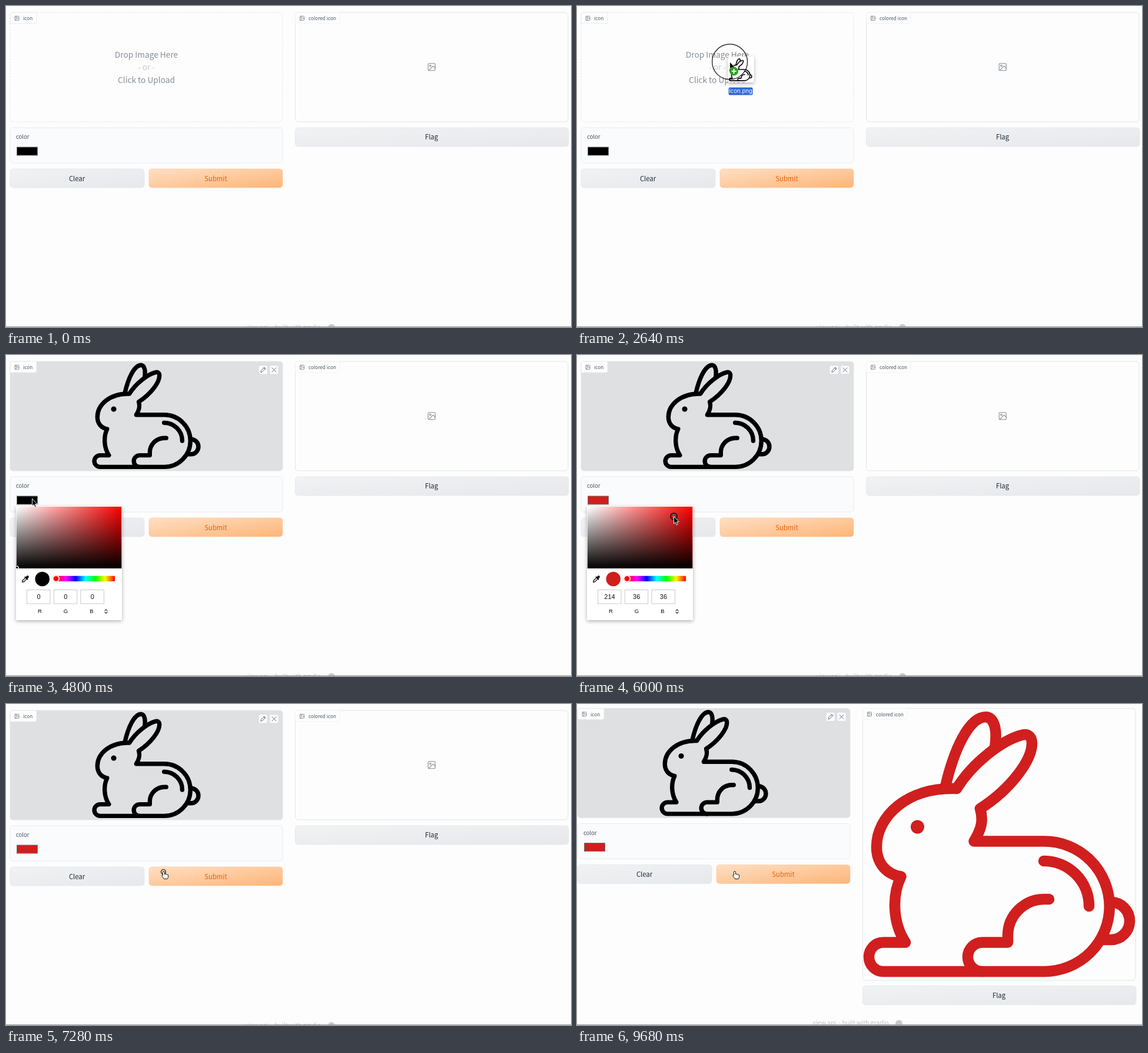
Animation of 960 by 546 pixels, one loop 9760 ms. Source, as an HTML page:

```html
<!DOCTYPE html>
<html lang="en">
<head>
<meta charset="utf-8">
<title>Icon colouring demo</title>
<style>
  html, body { margin: 0; width: 100%; height: 100%; overflow: hidden; background: #fdfdfd; }
  svg { display: block; }
  text { font-family: "Noto Sans CJK JP", "Noto Sans CJK SC", "Noto Sans CJK", "Open Sans", sans-serif; fill: #4b5563; }
  .mid { text-anchor: middle; }
  .button { font-size: 11.3px; font-weight: 500; fill: #1f2937; }
  .tag { font-size: 8.2px; }
  .drop { font-size: 13.7px; fill: #868c97; }
  .picker text { font-family: "Liberation Sans", Arial, sans-serif; fill: #111; }
  .line { fill: none; stroke-linecap: round; stroke-linejoin: round; }
  .panel { fill: #fdfdfd; stroke: #e2e4e9; }
</style>
</head>
<body>
<svg width="960" height="546" viewBox="0 0 960 546">
  <defs>
    <linearGradient id="grey" x2="1" y2="1">
      <stop stop-color="#f1f2f4"/><stop offset="1" stop-color="#e6e8eb"/>
    </linearGradient>
    <linearGradient id="orange" x2="1" y2="1">
      <stop stop-color="#ffdfc4"/><stop offset="1" stop-color="#fdb577"/>
    </linearGradient>
    <linearGradient id="saturation">
      <stop stop-color="#fff"/><stop offset="1" stop-color="#f00"/>
    </linearGradient>
    <linearGradient id="value" x2="0" y2="1">
      <stop stop-color="#000" stop-opacity="0"/><stop offset="1"/>
    </linearGradient>
    <linearGradient id="hue"></linearGradient>
    <filter id="shadow" x="-20%" y="-20%" width="140%" height="140%">
      <feDropShadow dx="0" dy="2" stdDeviation="3" flood-opacity=".3"/>
    </filter>
    <clipPath id="field"><rect x="17.5" y="258" width="179" height="105"/></clipPath>
    <g id="rabbit" class="line" stroke="currentColor" stroke-width="18.5">
      <path d="M645 144C560 141 509 192 509 243C509 272 527 290 550.5 293.5C535 325 536 372 558 405.5
        H520.7a24.7 24.7 0 0 0 0 49.5H794a110.7 110.7 0 0 0 0-221.5H674.5C687 213 691 198 685 178
        C738 144 773 95 773 67C773 54 765 50 755 53C722 62 672 100 645 144Z"/>
      <path d="M626 140C640 80 665 22 695 22C711 24 714 48 710 74"/>
      <path d="M802 332H794A62 62 0 0 0 732 394V405.5H688.7a24.7 24.7 0 0 0 0 49.5"/>
      <path d="M793 267A77 77 0 0 1 870 344M907 337a32 32 0 0 1 0 64H897"/>
      <circle cx="578.5" cy="209" r="11.5" fill="currentColor" stroke="none"/>
    </g>
    <g id="picture" class="line">
      <rect x="-6" y="-6" width="12" height="12" rx="1.5"/>
      <circle cx="-2.2" cy="-2.2" r="1.3"/>
      <path d="M6 2L2.5-1.5L-5 6"/>
    </g>
  </defs>

  <g id="page">
    <rect id="dropBox" class="panel" x="7" y="11" width="463" height="186" rx="5"/>
    <g id="dropHint" class="mid">
      <text class="drop" x="238.5" y="88">Drop Image Here</text>
      <text class="drop" x="238.5" y="109" style="fill:#c5c8ce">- or -</text>
      <text class="drop" x="238.5" y="130.5">Click to Upload</text>
    </g>
    <g id="loaded">
      <use href="#rabbit" transform="translate(-47.9 8.4) scale(.3992 .4)" color="#000"/>
      <g fill="#f9fafb" stroke="#d4d7dc" stroke-width=".8">
        <rect x="429" y="17.5" width="15.5" height="15.5" rx="3"/>
        <rect x="447.7" y="17.5" width="15.5" height="15.5" rx="3"/>
      </g>
      <path class="line" stroke="#5b6370" stroke-width=".9"
        d="M433 29l.6-2.6 5.5-5.5 2 2-5.5 5.5zM438 22l2 2M452 21.8l7 7M459 21.8l-7 7"/>
    </g>
    <path class="panel" stroke-width=".8" d="M7 30V15q0-4 4-4H52V27q0 3-3 3z"/>
    <use href="#picture" transform="translate(18.5 20.8) scale(.58)" stroke="#6b7280" stroke-width="1.4"/>
    <text class="tag" x="29" y="24">icon</text>

    <rect id="output" class="panel" x="491.5" y="11" width="463.5" rx="5"/>
    <path class="panel" stroke-width=".8" d="M491.5 30V15q0-4 4-4H567V27q0 3-3 3z" style="stroke:#eff0f3"/>
    <use href="#picture" transform="translate(503 20.8) scale(.58)" stroke="#6b7280" stroke-width="1.4"/>
    <text class="tag" x="514" y="24">colored icon</text>
    <use id="empty" href="#picture" transform="translate(723.2 103.7)" stroke="#858a93" stroke-width="1.1"/>
    <use id="result" href="#rabbit" transform="translate(6 3.5)" color="#d01f1e"/>
    <g id="flag">
      <rect x="491.5" y="207" width="464.5" height="32" rx="5" fill="url(#grey)" stroke="#e4e6e9" stroke-width=".8"/>
      <text class="button mid" x="723" y="227">Flag</text>
    </g>

    <rect class="panel" x="7" y="207" width="463" height="60" rx="5" style="fill:#fafbfc;stroke:#e9ebef"/>
    <text x="17" y="226" font-size="9.5">color</text>
    <rect id="swatch" x="18.5" y="240" width="35" height="14" stroke="#777"/>
    <rect x="7" y="277" width="228" height="32" rx="5" fill="url(#grey)" stroke="#e4e6e9" stroke-width=".8"/>
    <text class="button mid" x="120.5" y="297.5">Clear</text>
    <rect x="243" y="277" width="227" height="32" rx="5" fill="url(#orange)" stroke="#fbc79b" stroke-width=".6"/>
    <text class="button mid" x="356.5" y="297.5" style="fill:#ea620c">Submit</text>
    <g opacity=".75">
      <text class="mid" x="471" y="549.5" font-size="10.3" style="fill:#a9adb5">view api · built with gradio</text>
      <circle cx="553" cy="547" r="6" fill="#b6b9c0"/>
    </g>
  </g>

  <g id="picker" class="picker">
    <rect x="17" y="257.5" width="180" height="193.5" fill="#fff" filter="url(#shadow)"/>
    <g clip-path="url(#field)">
      <rect x="17.5" y="258" width="179" height="105" fill="url(#saturation)"/>
      <rect x="17.5" y="258" width="179" height="105" fill="url(#value)"/>
      <g id="handle">
        <circle r="5" fill="none" stroke="#000" stroke-width="2.5"/>
        <circle id="handleDot" r="4" stroke="#fff" stroke-width="1.6"/>
      </g>
    </g>
    <g transform="translate(33 381) rotate(45)">
      <path d="M-2-6q2-3 4 0v3h1.5v2h-7v-2h1.5z"/>
      <path d="M-1.5-1v6.5l1.5 2 1.5-2v-6.5" fill="none" stroke="#000" stroke-width="1.2"/>
    </g>
    <circle id="sample" cx="61.7" cy="381" r="12.3"/>
    <rect x="85" y="375.7" width="100" height="9.3" rx="1.5" fill="url(#hue)"/>
    <circle cx="85" cy="380.4" r="5.2" fill="#f00" stroke="#fff" stroke-width="1.5"/>
    <circle cx="85" cy="380.4" r="6.2" fill="none" stroke="#bbb" stroke-width=".5"/>
    <g id="channels" class="mid"></g>
    <path class="line" stroke="#222" stroke-width="1.1" d="M168 434.8l2-2 2 2M168 437.4l2 2 2-2"/>
  </g>

  <path d="M0 545.5H960" stroke="#999"/>

  <g id="pointer">
    <g id="drag">
      <rect x="-3" y="-9" width="44" height="44" rx="3" fill="#fff" filter="url(#shadow)"/>
      <use href="#rabbit" transform="translate(-43.5 -7) scale(.086)" color="#000"/>
      <rect x="-2" y="43.5" width="41" height="13" rx="2" fill="#2f66d6"/>
      <text class="mid" x="18.5" y="53.4" font-size="9.6"
        style="fill:#fff;font-family:Inter,'Liberation Sans',sans-serif">icon.png</text>
    </g>
    <circle id="ring" fill="none" stroke="#111" stroke-width="1.2"/>
    <path id="arrow" d="M0 0V12.5L2.8 10 4.8 14.5 6.8 13.6 4.9 9.3H8.8Z" fill="#000" stroke="#fff" stroke-width=".9"/>
    <g id="badge">
      <circle cx="7" cy="16" r="7" fill="#25a51c" stroke="#1b8a14" stroke-width=".6"/>
      <path d="M3 16h8M7 12v8" stroke="#fff" stroke-width="2"/>
    </g>
    <path id="hand" d="M-1 1q0-2 1.5-2t1.5 2v3q1.500-1 2.300.3 1.500-.7 2 .5 2-.3 2 1.500l-.6 3.700q-.4 1-.9 2H1q-1-2-3.800-5 .2-2 1.800-.8z"
      fill="#fff" stroke="#111" stroke-width="1"/>
  </g>
</svg>

<script>
const LOOP = 9760, STEP = 80;
const el = id => document.getElementById(id);
const show = (id, on) => el(id).setAttribute("display", on ? "inline" : "none");
const set = (id, attrs) => Object.entries(attrs).forEach(([k, v]) => el(id).setAttribute(k, v));
const between = (t, a, b) => t >= a && t < b;

el("hue").innerHTML = Array.from({ length: 7 }, (_, i) =>
  `<stop offset="${i / 6}" stop-color="hsl(${360 - i * 60} 100% 50%)"/>`).join("");

el("channels").innerHTML = ["R", "G", "B"].map((name, i) => {
  const x = 55.5 + i * 45.7;
  return `<rect x="${x - 20}" y="399.5" width="39.5" height="23.500" fill="#fff" stroke="#c9c9c9"/>
    <text id="${name}" x="${x}" y="415" font-size="11"></text>
    <text x="${57.5 + i * 44}" y="439.3" font-size="9.5">${name}</text>`;
}).join("");

const linear = p => p;
const easeOut = p => p * (2 - p);
const smooth = p => p * p * (3 - 2 * p);

// Cursor stops: time, x, y and the easing used to arrive there.
const stops = [
  [1840, 1060, 252, linear], [2080, 928, 219, linear], [2720, 249, 93, easeOut],
  [3360, 249, 93, linear], [4320, 44.5, 244.5, smooth], [5040, 44.5, 244.5, linear],
  [5920, 164.5, 274.5, smooth], [6400, 164.5, 274.5, linear], [6960, 267.5, 285.5, smooth]
];

function cursorAt(t) {
  const i = stops.findIndex(s => s[0] > t);
  if (i < 0) return stops.at(-1).slice(1, 3);
  if (i === 0) return stops[0].slice(1, 3);
  const [t0, x0, y0] = stops[i - 1], [t1, x1, y1, ease] = stops[i];
  const p = ease((t - t0) / (t1 - t0));
  return [x0 + (x1 - x0) * p, y0 + (y1 - y0) * p];
}

// Mouse presses: start and end; the ring grows while the button is held.
const presses = [[1700, 2880], [4480, 4640], [6000, 6240], [7040, 7200], [7280, 7440]];

function draw(t) {
  const loaded = t >= 2880, picked = t >= 6000, done = t >= 7520;
  const dragging = between(t, 1840, 2880);
  const rgb = picked ? [214, 36, 36] : [0, 0, 0];
  const color = picked ? "#d01e1d" : "#000";

  set("page", { transform: done ? "translate(-6 -3.5)" : "" });
  set("dropBox", {
    style: loaded ? "fill:#dfe0e2;stroke:#e2e4e7" : "stroke-dasharray:3 2"
  });
  show("dropHint", !loaded);
  show("loaded", loaded);
  show("empty", !done);
  show("result", done);
  set("output", { height: done ? 462.5 : 186 });
  set("flag", { transform: done ? "translate(0 276)" : "" });
  set("swatch", { fill: color });

  show("picker", between(t, 4640, 7200));
  set("handle", { transform: picked ? "translate(164.5 274.5)" : "translate(17.5 363)" });
  set("handleDot", { fill: color });
  set("sample", { fill: color });
  ["R", "G", "B"].forEach((name, i) => { el(name).textContent = rgb[i]; });

  const [x, y] = cursorAt(t);
  const press = presses.find(([a, b]) => between(t, a, b));
  const hand = t >= 7200;
  show("pointer", t >= 1840);
  set("pointer", { transform: `translate(${x} ${y})` });
  show("drag", dragging);
  show("badge", dragging);
  show("arrow", !hand);
  show("hand", hand);
  show("ring", press);
  if (press) set("ring", { r: Math.min(30, 4 + (t - press[0]) * 0.1625) });
}

const start = performance.now();
function tick() {
  const t = (performance.now() - start) % LOOP;
  draw(Math.floor(t / STEP) * STEP);
  requestAnimationFrame(tick);
}
tick();
</script>
</body>
</html>
```
